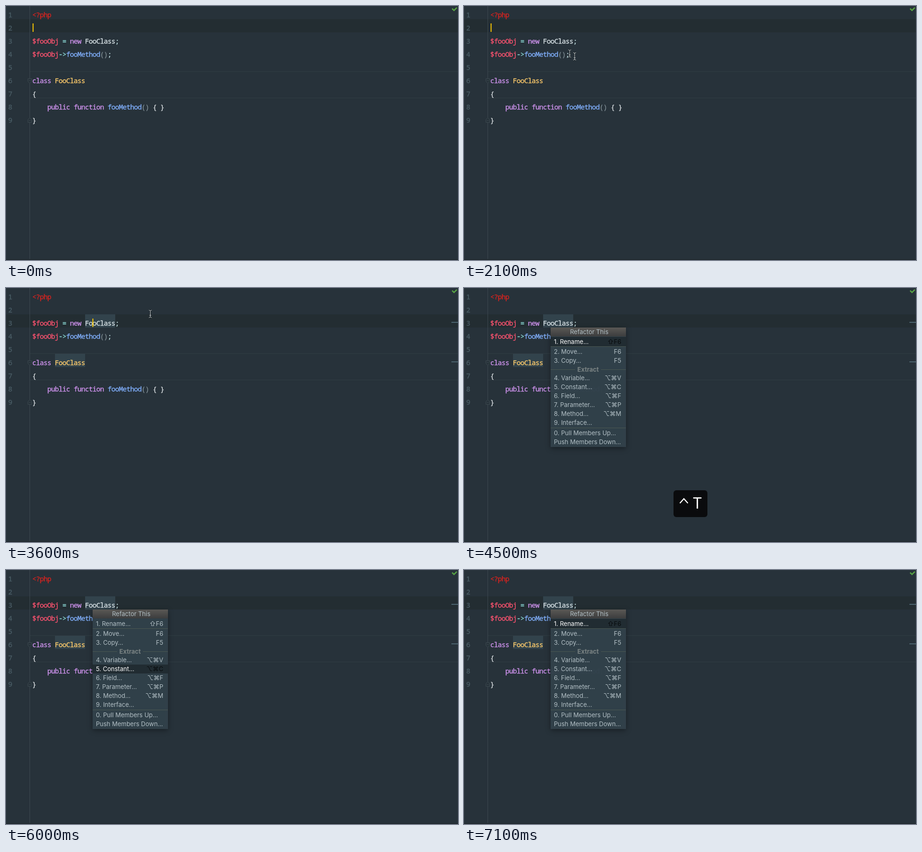
Write an HTML page that moves like this. It is 960 px wide and 540 px high and loops after 8 s.

```html
<!DOCTYPE html>
<html lang="en">
<head>
<meta charset="utf-8">
<title>Refactor This</title>
<style>
html, body { margin: 0; width: 100%; height: 100%; overflow: hidden; background: #27323a; }
svg { display: block; }
text { white-space: pre; }
.code {
  font: 500 14.5px "Noto Sans Mono", "DejaVu Sans Mono", monospace;
  letter-spacing: -.7px; stroke-width: .3px;
}
.ui { font: 400 13px Inter, "DejaVu Sans", sans-serif; fill: #b3c0c6; }
.big { font: 400 32px Inter, "Open Sans", sans-serif; fill: #fff; }
#popup { filter: drop-shadow(0 3px 6px rgba(0, 0, 0, .38)); }
</style>
</head>
<body>
<svg id="stage" width="960" height="540" viewBox="0 0 960 540">
  <defs>
    <linearGradient id="bar" x2="0" y2="1">
      <stop stop-color="#5a5855"/><stop offset="1" stop-color="#3c3d3e"/>
    </linearGradient>
    <path id="beamPath" d="M-3 -8Q0 -8 0 -5.5Q0 -8 3 -8M0 -5.5V5.5M-3 8Q0 8 0 5.5Q0 8 3 8M-2 3H2" fill="none"/>
    <g id="beam">
      <use href="#beamPath" stroke="#10171a" stroke-width="2.6"/>
      <use href="#beamPath" stroke="#d3dadd"/>
    </g>
  </defs>
  <rect width="960" height="540" fill="#27323a"/>
  <rect id="row" width="960" height="28" fill="#232d32"/>
  <g id="usages">
    <path d="M168 56h64v28h-64zM104 140h64v28h-64z" fill="#32434c"/>
    <path d="M946 73h14M946 157h14" stroke="#4d6570" stroke-width="2"/>
  </g>
  <path d="M50 139.5H960M50 195.5H960" stroke="#303c43"/>
  <path d="M50.5 0V540" stroke="#3c494f"/>
  <path d="M0 539H960" stroke="#20292f" stroke-width="2"/>
  <path d="M46.5 154.5h8v6l-4 4l-4 -4zM46.5 247.5h8v-6l-4 -4l-4 4z" fill="#27323a" stroke="#3c494f"/>
  <path d="M48.5 158.5h4M48.5 243.5h4" stroke="#3c494f"/>
  <path d="M947.5 5.500l4 4l6 -6" fill="none" stroke="#57a344" stroke-width="2.6"/>
  <g id="code"></g>
  <rect id="caret" width="2" height="18" fill="#ffcc00"/>
  <use id="ghost" href="#beam"/>
  <use id="mouse" href="#beam"/>
  <g id="popup">
    <rect x="184" y="84" width="160" height="254" fill="#32424b" fill-opacity=".97"/>
    <rect x="184" y="84" width="160" height="19" fill="url(#bar)"/>
    <path d="M184 124.500h160M184 173.500h52M291 173.500h53M184 297.500h160" stroke="#4b5852"/>
    <rect id="pick" x="184" width="160" fill="#212c32"/>
    <text class="ui" x="266" y="98" text-anchor="middle">Refactor This</text>
    <text class="ui" x="263.500" y="178" text-anchor="middle" style="font-weight:700;fill:#7b8484">Extract</text>
    <g id="items"></g>
  </g>
  <g id="toast">
    <rect x="445" y="430" width="72" height="57" rx="6" fill="#0a0b0d"/>
    <path d="M458.500 457.500L467 448L475.500 457.500" fill="none" stroke="#fff" stroke-width="2.3"/>
    <text class="big" x="495.500" y="469" text-anchor="middle">T</text>
  </g>
</svg>
<script>
const $ = id => document.getElementById(id);
const LOOP = 8000, STEP = 100;

function addText(parent, x, y, str, attrs) {
  const el = document.createElementNS("http://www.w3.org/2000/svg", "text");
  for (const [name, value] of Object.entries({ x, y, ...attrs })) el.setAttribute(name, value);
  el.textContent = str;
  parent.append(el);
  return el;
}
const addCode = (x, y, str, color) =>
  addText($("code"), x, y, str, { class: "code", fill: color, stroke: color });

const ink = {
  tag: "#d9231f", v: "#ff5370", op: "#8fe0dc", key: "#d194f0", name: "#d9e3e7",
  cls: "#ffcb6b", fn: "#82b1ff", par: "#7f8d94", end: "#c3e2e4", brace: "#e3e8ea"
};
// Each token: column, colour, text
const lines = [
  [[0, "tag", "<?php"]],
  [],
  [[0, "v", "$fooObj"], [8, "op", "="], [10, "key", "new"], [14, "name", "FooClass"], [22, "end", ";"]],
  [[0, "v", "$fooObj"], [7, "op", "->"], [9, "fn", "fooMethod"], [18, "par", "()"], [20, "end", ";"]],
  [],
  [[0, "key", "class"], [6, "cls", "FooClass"]],
  [[0, "brace", "{"]],
  [[4, "key", "public"], [11, "key", "function"], [20, "fn", "fooMethod"], [29, "par", "()"], [32, "brace", "{ }"]],
  [[0, "brace", "}"]]
];
lines.forEach((line, i) => {
  const y = 23.5 + 28 * i;
  addCode(4.7, y, i + 1, "#4a5d66");
  for (const [col, color, str] of line) addCode(55.7 + 8 * col, y, str, ink[color]);
});

// Each item: middle of the row, label, shortcut
const items = [
  [114, "1. Rename...", "⇧F6"], [135.5, "2. Move...", "F6"], [154.5, "3. Copy...", "F5"],
  [191.5, "4. Variable...", "⌥⌘V"], [210.5, "5. Constant...", "⌥⌘C"], [229.5, "6. Field...", "⌥⌘F"],
  [248.5, "7. Parameter...", "⌥⌘P"], [267.5, "8. Method...", "⌥⌘M"], [286.5, "9. Interface...", ""],
  [308.5, "0. Pull Members Up...", ""], [327.5, "Push Members Down...", ""]
].map(([mid, label, keys]) => ({
  mid,
  label: addText($("items"), 191, mid + 4.5, label, { class: "ui" }),
  keys: addText($("items"), 334, mid + 4.5, keys, { class: "ui", "text-anchor": "end" })
}));

const path = [
  [600, 763, 534], [700, 690, 470], [800, 560, 366], [900, 442, 274], [1000, 401, 240],
  [1300, 401, 240], [1500, 380, 222], [1800, 296, 153], [2050, 235, 107], [2100, 224.5, 101],
  [2200, 212, 93], [2400, 190, 77], [2600, 188, 75],
  [3000, 188, 75], [3200, 214, 70], [3400, 278, 59], [3600, 306.5, 55]
];
const fade = [[4000, 0], [4300, 1], [5400, 1], [5500, .82], [5800, 0]];
const picks = [[0, 0], [5500, 1], [5700, 2], [5800, 3], [6000, 4], [6400, 3], [6600, 2], [6700, 1], [7100, 0]];
const blinks = [[0, 400], [900, 1400], [1900, 3100], [3400, 3900]];

function lerp(table, t, k) {
  const i = table.findIndex(p => p[0] > t);
  if (i < 0) return table[table.length - 1][k];
  if (i === 0) return table[0][k];
  const a = table[i - 1], b = table[i];
  return a[k] + (b[k] - a[k]) * (t - a[0]) / (b[0] - a[0]);
}
const show = (id, on) => $(id).setAttribute("visibility", on ? "visible" : "hidden");
const place = (id, [x, y]) => $(id).setAttribute("transform", `translate(${x} ${y})`);
const spot = t => [lerp(path, t, 1), lerp(path, t, 2)];

function draw(t) {
  const clicked = t >= 2400, open = t >= 4300;
  $("row").setAttribute("y", clicked ? 56 : 28);
  place("caret", clicked ? [183.5, 65] : [56.5, 37]);
  show("caret", blinks.some(([a, b]) => t >= a && t < b));
  show("usages", t >= 3100);

  // A fast pointer leaves a trailing copy
  const now = spot(t), past = spot(t - 50);
  const seen = t >= 600 && t < 4100;
  place("mouse", now);
  place("ghost", past);
  show("mouse", seen);
  show("ghost", seen && t > 600 && Math.hypot(now[0] - past[0], now[1] - past[1]) > 8);

  show("popup", open);
  const sel = picks.filter(p => p[0] <= t).pop()[1];
  $("pick").setAttribute("y", items[sel].mid - (sel ? 9.5 : 10));
  $("pick").setAttribute("height", sel ? 19 : 20);
  items.forEach((item, i) => {
    item.label.style.fill = i === sel ? "#fff" : "";
    item.keys.style.fill = i === sel ? "#080b0d" : "";
  });
  $("toast").setAttribute("opacity", lerp(fade, t, 1));
}

const start = performance.now();
function tick() {
  const t = (performance.now() - start) % LOOP;
  draw(Math.floor(t / STEP) * STEP);
  requestAnimationFrame(tick);
}
tick();
</script>
</body>
</html>
```
